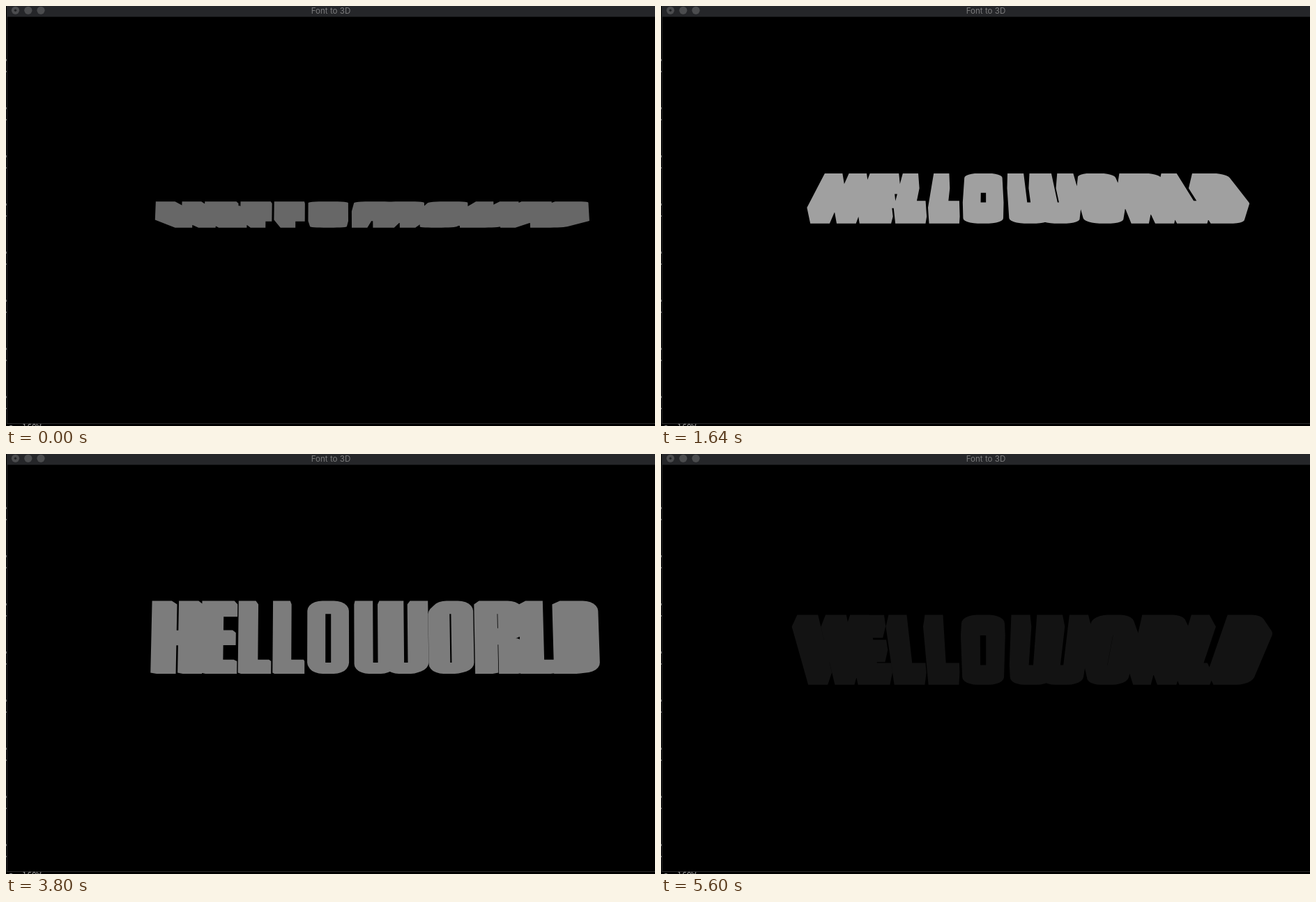
Animation of 931x602 px, one loop 5.64 s. Source, as an HTML page:

```html
<!DOCTYPE html>
<html lang="en">
<head>
<meta charset="utf-8">
<title>Font to 3D</title>
<style>
  html, body { margin: 0; width: 100%; height: 100%; overflow: hidden; background: #000; }
  svg { display: block; width: 931px; height: 602px; }
  .title { font: 11.6px Inter, Roboto, sans-serif; fill: #7b7b7c; text-anchor: middle; }
  .below { font: 11px "DejaVu Sans Mono", monospace; fill: #a8a8a8; white-space: pre; }
</style>
</head>
<body>
<svg viewBox="0 0 931 602">
  <rect width="931" height="602" fill="#000"/>
  <path d="M.5 76V590" stroke="#6a6a6a" stroke-dasharray="3 14 2 50"/>
  <path d="M1.5 0V598M1 598.5H931" fill="none" stroke="#29292a"/>
  <text class="below" x="4" y="606.5">a. l60W</text>
  <rect x="1" width="930" height="15.5" fill="#252629"/>
  <g fill="#4b4c4e">
    <circle cx="13.5" cy="6.3" r="5.6"/>
    <circle cx="31.8" cy="6.3" r="5.6"/>
    <circle cx="50" cy="6.3" r="5.6"/>
  </g>
  <circle cx="13.5" cy="6.3" r="1.7" fill="#222325"/>
  <text class="title" x="466" y="10.7">Font to 3D</text>
  <path id="word"/>
</svg>
<script>
const LOOP = 5640, STEP = 40;
const CENTER = { x: 465.5, y: 307.5 };
const CAMERA = 780, DEPTH = 26.5, PIVOT = 7.5;
const START = 97, SPEED = 0.0245;        // degrees, degrees per ms
const LIGHT = 45, AMBIENT = 6, DIFFUSE = 157;

const WORD = "HELLOWORLD", LEFT = -249.3;
const CAP = 100.5, STEM = 25, COUNTER = 9, BAR = 18, ARCH = 14, CURVE = 21;
const rad = deg => deg * Math.PI / 180;

// A rectangle whose named corners (bl, br, tr, tl) are elliptic arcs.
function block(x, y, w, h, round = "", rx = CURVE, ry = ARCH) {
  return ["bl", "br", "tr", "tl"].flatMap((corner, i) => {
    const sx = corner[1] === "r" ? 1 : -1, sy = corner[0] === "t" ? 1 : -1;
    const cx = sx > 0 ? x + w : x, cy = sy > 0 ? y + h : y;
    if (!round.includes(corner)) return [[cx, cy]];
    return Array.from({ length: 7 }, (_, k) => {
      const a = rad(180 + 90 * i + 15 * k);
      return [cx - sx * rx + rx * Math.cos(a), cy - sy * ry + ry * Math.sin(a)];
    });
  });
}

const stem = (x = 0, w = STEM) => block(x, 0, w, CAP);
const bar = (w, at = 0) => block(0, at * CAP, w, BAR);
const foot = (x, w, round) => block(x, 0, w, ARCH, round);
const head = (x, w, round) => block(x, CAP - ARCH, w, ARCH, round);
const side = (x, w, from = ARCH, to = CAP - ARCH) => block(x, from, w, to - from);

const cup = x => {
  const w = 2 * STEM + COUNTER;
  return [foot(x, w, "bl br"), side(x, STEM, ARCH, CAP), side(x + w - STEM, STEM, ARCH, CAP)];
};

// Each letter is a union of convex blocks.
const GLYPHS = {
  H: { advance: 70, parts: [stem(0, 27.5), stem(37.5, 27.5), block(20, 41, 25, BAR)] },
  E: { advance: 51, parts: [stem(), bar(45), bar(43, 0.41), bar(45, 0.82)] },
  L: { advance: 48, parts: [stem(0, 24), bar(43)] },
  O: { advance: 66.4, parts: [foot(0, 58, "bl br"), head(0, 58, "tl tr"), side(0, STEM), side(33, STEM)] },
  W: { advance: 107, parts: [...cup(0), ...cup(43)] },
  R: { advance: 65, parts: [stem(), head(0, 61, "tr"), side(34, 27, 62),
                            block(20, 48, 41, ARCH, "br", 12), block(34, 0, 27, 48, "tr", 12, 10),
                            block(20, 42, 26, BAR)] },
  D: { advance: 53, parts: [stem(0, 22), foot(0, 53, "br"), head(0, 53, "tr"), side(31, 22)] }
};

let pen = LEFT;
const solids = [...WORD].flatMap(name => {
  const { advance, parts } = GLYPHS[name], left = pen;
  pen += advance;
  return parts.map(points => points.map(([x, y]) => [x + left, y - PIVOT]));
});

const area = pts => pts.reduce((sum, [x, y], i) => {
  const [nx, ny] = pts[(i + 1) % pts.length];
  return sum + x * ny - nx * y;
}, 0);

// All faces wind the same way, so a nonzero fill gives one seamless silhouette.
const trace = pts => {
  const ordered = area(pts) < 0 ? [...pts].reverse() : pts;
  return "M" + ordered.map(p => p[0].toFixed(2) + " " + p[1].toFixed(2)).join("L") + "Z";
};

function silhouette(angle) {
  const cos = Math.cos(angle), sin = Math.sin(angle);
  const project = z => ([x, y]) => {
    const scale = CAMERA / (CAMERA + y * sin - z * cos);
    return [CENTER.x + x * scale, CENTER.y - (y * cos + z * sin) * scale];
  };
  return solids.map(points => {
    const back = points.map(project(0)), front = points.map(project(DEPTH));
    const walls = points.map((_, i) => {
      const j = (i + 1) % points.length;
      return trace([front[i], front[j], back[j], back[i]]);
    });
    return trace(back) + trace(front) + walls.join("");
  }).join("");
}

const word = document.getElementById("word");

function draw(time) {
  const t = Math.floor(time % LOOP / STEP) * STEP;
  const tilt = START - SPEED * t;
  const shade = Math.round(AMBIENT + DIFFUSE * Math.cos(rad(tilt - LIGHT)));
  word.setAttribute("d", silhouette(rad(tilt)));
  word.setAttribute("fill", `rgb(${shade},${shade},${shade})`);
}

const begin = performance.now();
function tick() {
  draw(performance.now() - begin);
  requestAnimationFrame(tick);
}
tick();
</script>
</body>
</html>
```
